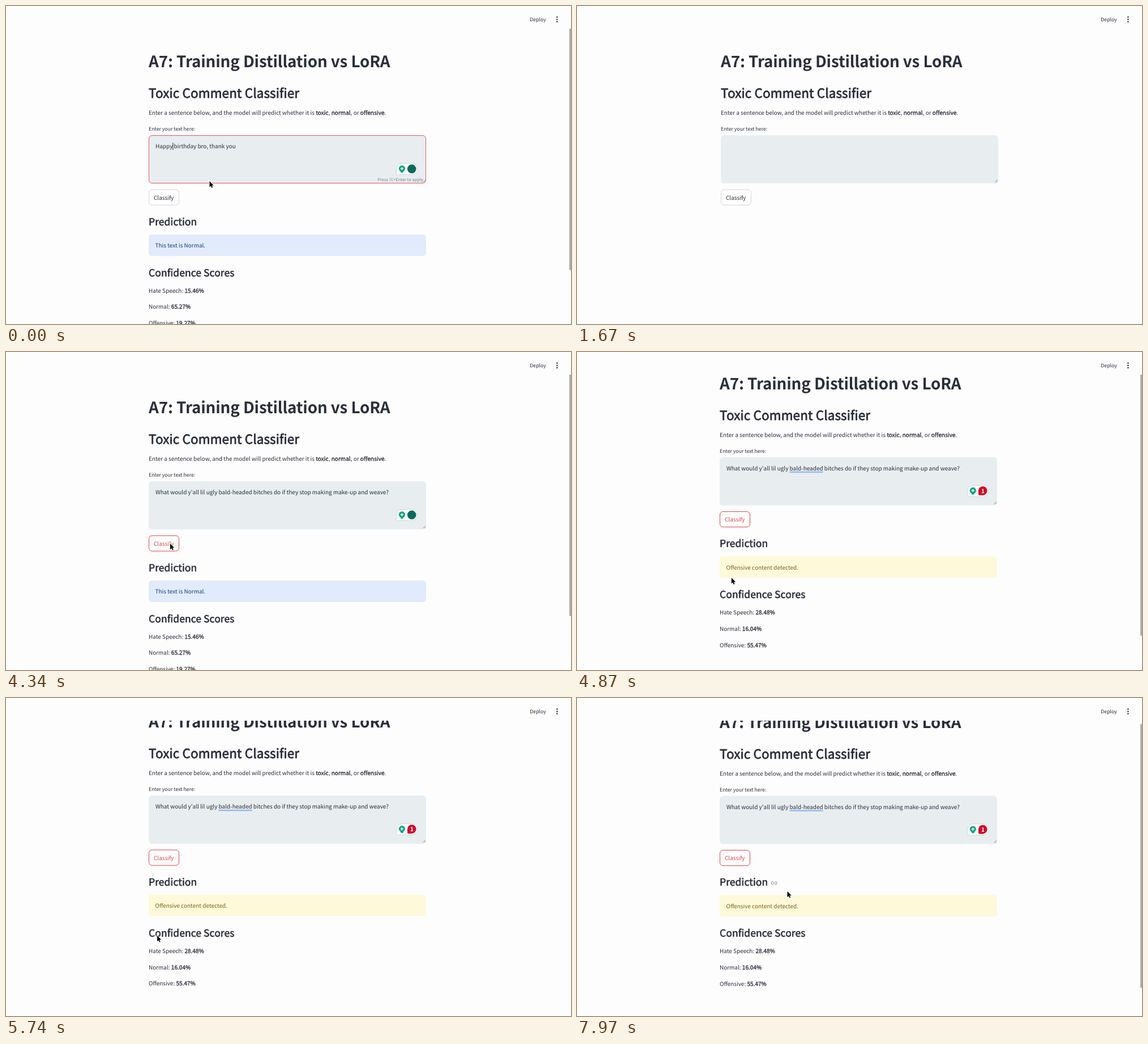
An HTML page with a canvas that plays this animation: 998x561 px, repeating every 8000 ms.

```html
<!DOCTYPE html>
<html lang="en">
<head>
<meta charset="utf-8">
<title>Toxic Comment Classifier</title>
<style>
  html, body { margin: 0; width: 100%; height: 100%; overflow: hidden; background: #fdfdfd; }
  canvas { display: block; width: 998px; height: 561px; }
</style>
</head>
<body>
<canvas id="stage"></canvas>
<script>
const W = 998, H = 561, LOOP = 8000;
const FAMILY = '"Noto Sans CJK JP", "Noto Sans CJK SC", "Noto Sans CJK", "Open Sans", sans-serif';
const PAPER = '#fdfdfd', INK = '#2b2d39', RED = '#d9484a', FIELD = '#e8edf0', GRAY = '#7f8088';
const LEFT = 252, WIDTH = 490, RADIUS = 5.5;
const BODY = 9.98, SMALL = 8.74, HINT = 7.48, H1 = 27.8, H2 = 22.44, H3 = 17.46;
const SCROLL_DEPTH = 56, SCROLL_EASE = 156, MOVE_TIME = 330;

const canvas = document.getElementById('stage');
const ctx = canvas.getContext('2d');
const dpr = window.devicePixelRatio || 1;
canvas.width = Math.round(W * dpr);
canvas.height = Math.round(H * dpr);

const GREETING = 'Happy birthday bro, thank you';
const QUESTION = "What would y'all lil ugly bald-headed bitches do if they stop making make-up and weave?";
const FLAGGED = 'bald-headed';

const RESULTS = {
  normal: {
    note: 'This text is Normal.', fill: '#e2ebfc', ink: '#103f75',
    scores: { 'Hate Speech': '15.46%', Normal: '65.27%', Offensive: '19.27%' }
  },
  offensive: {
    note: 'Offensive content detected.', fill: '#fdf9d9', ink: '#7d611c',
    scores: { 'Hate Speech': '28.48%', Normal: '16.04%', Offensive: '55.47%' }
  }
};

// Places the pointer moves between.
const AREA = { x: 359.5, y: 309 }, BUTTON = { x: 290, y: 338 };
const HEADING = { x: 267, y: 419 }, MARGIN = { x: 204, y: 400 }, NOTE = { x: 371.5, y: 341 };

const BLANK = {
  text: '', focus: false, hot: false, caret: false, result: null, bar: false,
  alert: false, link: null, path: null, scrollFrom: Infinity
};

// Each step changes part of the page state from its time on.
const STEPS = [
  [0, { ...BLANK, text: GREETING, focus: true, caret: true, result: 'normal', bar: true, path: [AREA, BUTTON] }],
  [450, { focus: false, hot: true, caret: false }],
  [850, { scrollFrom: 850, path: [BUTTON, HEADING] }],
  [1480, BLANK],
  [1980, { focus: true }],
  [2250, { text: GREETING, path: [AREA, BUTTON] }],
  [2740, { focus: false, hot: true }],
  [2830, { result: 'normal' }],
  [3000, { path: null }],
  [3640, { focus: true, hot: false }],
  [3900, { text: QUESTION, path: [AREA, BUTTON] }],
  [4270, { focus: false, hot: true, bar: true }],
  [4500, { result: 'offensive' }],
  [4650, { scrollFrom: 4650, path: [BUTTON, HEADING] }],
  [4800, { alert: true }],
  [5080, { link: 'scores' }],
  [5270, { link: null }],
  [5540, { bar: false }],
  [5800, BLANK],
  [6690, { focus: true }],
  [6990, { text: QUESTION }],
  [7190, { focus: false, hot: true }],
  [7640, { result: 'offensive', alert: true, bar: true, scrollFrom: 7250, path: [MARGIN, NOTE] }],
  [7870, { link: 'prediction' }]
];

function stateAt(t) {
  const state = {};
  for (const [start, change] of STEPS) {
    if (start > t) break;
    Object.assign(state, change);
    if (change.path) state.moveFrom = start;
  }
  const age = Math.max(0, t - state.scrollFrom);
  state.scroll = SCROLL_DEPTH * (1 - Math.exp(-age / SCROLL_EASE));
  return state;
}

// Draws text and returns where it ends; 'semi' thickens the regular weight.
function text(str, x, y, { size = BODY, color = INK, weight = 'regular' } = {}) {
  const semi = weight === 'semi';
  ctx.font = `${weight === 'bold' ? 700 : 400} ${size}px ${FAMILY}`;
  ctx.textRendering = 'geometricPrecision';
  ctx.letterSpacing = size * (semi ? 0.006 : weight === 'bold' ? -0.005 : 0) + 'px';
  ctx.fillStyle = color;
  ctx.fillText(str, x, y);
  if (semi) {
    ctx.lineWidth = size * 0.035;
    ctx.lineJoin = 'round';
    ctx.strokeStyle = color;
    ctx.strokeText(str, x, y);
  }
  return x + ctx.measureText(str).width;
}

// Sets a line in which **marked** parts are semibold.
function rich(str, x, y) {
  str.split('**').forEach((part, i) => {
    x = text(part, x, y, { weight: i % 2 ? 'semi' : 'regular' });
  });
}

function box(x, y, w, h, r, fill, stroke) {
  ctx.beginPath();
  ctx.roundRect(x, y, w, h, r);
  if (fill) { ctx.fillStyle = fill; ctx.fill(); }
  if (stroke) { ctx.strokeStyle = stroke; ctx.lineWidth = 1; ctx.stroke(); }
}

function disc(x, y, r, fill) {
  ctx.beginPath();
  ctx.arc(x, y, r, 0, Math.PI * 2);
  ctx.fillStyle = fill;
  ctx.fill();
}

function line(color, width, x1, y1, x2, y2) {
  ctx.beginPath();
  ctx.moveTo(x1, y1);
  ctx.lineTo(x2, y2);
  ctx.strokeStyle = color;
  ctx.lineWidth = width;
  ctx.stroke();
}

function linkIcon(x, y) {
  box(x - 5, y - 2.6, 10, 5.2, 2.6, null, GRAY);
  ctx.fillStyle = PAPER;
  ctx.fillRect(x - 1, y - 4, 2, 8);
  line(GRAY, 1, x - 2.2, y, x + 2.2, y);
}

function heading(str, y, linked) {
  const end = text(str, LEFT, y, { size: H3, weight: 'semi' });
  if (linked) linkIcon(end + 11, y - 4.8);
}

function badge(alert) {
  const green = '#13a383', x = 699.4, y = 286.8, r = 7.8;
  box(689.5, 277.5, 37, 20, [10, 10, 10, 2], PAPER, '#d3d6d9');
  disc(x, y, 5.6, green);
  box(x - 2.4, y + 4.2, 4.8, 3, 1, green);
  line('#fff', 1.5, x, y - 2.6, x, y + 2.6);
  line('#fff', 1.5, x - 2.6, y, x + 2.6, y);
  if (alert) {
    box(709, 279.5, 2 * r, 2 * r, [r, r, r, 2], '#c8102e');
    text('1', 714, 291, { color: '#fff', weight: 'bold' });
  } else {
    disc(716.7, 287.4, r, '#0b6b5d');
  }
}

function field(s) {
  const x = LEFT + 12, y = 251, right = LEFT + WIDTH - 1;
  const widthOf = str => ctx.measureText(str).width;
  text('Enter your text here:', LEFT, 220, { size: SMALL });
  box(LEFT + 0.5, 228.5, WIDTH - 1, 84, RADIUS, FIELD, s.focus ? '#df5a60' : FIELD);
  for (const d of [4.5, 1.8]) line('#777', 0.8, right - d, 311, right, 311 - d);
  if (!s.text) return;

  text(s.text, x, y);
  if (s.alert) {
    const from = x + widthOf(s.text.split(FLAGGED)[0]);
    line('#82b1ee', 2, from, y + 3.2, from + widthOf(FLAGGED), y + 3.2);
  }
  if (s.caret) {
    const at = x + widthOf('Happy') + 0.5;
    line(INK, 1, at, y - 10, at, y + 3);
  }
  badge(s.alert);
  if (s.focus) {
    ctx.textAlign = 'right';
    text('Press \u2318+Enter to apply', right - 4, 309, { size: HINT, color: GRAY });
    ctx.textAlign = 'left';
  }
}

function results(s) {
  const r = RESULTS[s.result];
  heading('Prediction', 386.8, s.link === 'prediction');
  box(LEFT, 403, WIDTH, 38, RADIUS, r.fill);
  text(r.note, LEFT + 11.5, 426, { color: r.ink });
  heading('Confidence Scores', 476.6, s.link === 'scores');
  Object.entries(r.scores).forEach(([name, score], i) => {
    rich(`${name}: **${score}**`, LEFT, 505.6 + i * 28.85);
  });
}

function page(s) {
  text('A7: Training Distillation vs LoRA', LEFT, 108.4, { size: H1, weight: 'bold' });
  text('Toxic Comment Classifier', LEFT, 162, { size: H2, weight: 'semi' });
  rich('Enter a sentence below, and the model will predict whether it is ' +
    '**toxic**, **normal**, or **offensive**.', LEFT, 192);
  field(s);
  box(LEFT + 0.5, 324, 53, 27.2, RADIUS, PAPER, s.hot ? RED : '#d5d6da');
  text('Classify', LEFT + 9, 341.6, { color: s.hot ? RED : INK });
  if (s.result) results(s);
}

function header() {
  ctx.fillStyle = PAPER;
  ctx.fillRect(0, 0, W, 40);
  text('Deploy', 925.3, 27.2, { size: SMALL });
  for (const d of [-1, 0, 1]) disc(973.4, 23.7 + d * 4.1, 1.25, INK);
}

const ARROW = new Path2D('M0 0V10.4L2.4 8.2L4 11.8L5.7 11L4.1 7.5L7.3 7.4Z');
const BEAM = new Path2D('M-2.5 -6L0 -5L2.5 -6M0 -5V5M-2.5 6L0 5L2.5 6');

function pointer(s, t) {
  if (!s.path) return;
  const [a, b] = s.path;
  const k = Math.min(1, (t - s.moveFrom) / MOVE_TIME);
  const ease = k * k * (3 - 2 * k);
  ctx.save();
  ctx.translate(a.x + (b.x - a.x) * ease, a.y + (b.y - a.y) * ease);
  if (s.link === 'scores') {
    ctx.lineWidth = 1;
    ctx.strokeStyle = '#222';
    ctx.stroke(BEAM);
  } else {
    ctx.lineWidth = 1.6;
    ctx.strokeStyle = '#fff';
    ctx.stroke(ARROW);
    ctx.fillStyle = '#000';
    ctx.fill(ARROW);
  }
  ctx.restore();
}

function render(t) {
  const s = stateAt(t);
  ctx.setTransform(dpr, 0, 0, dpr, 0, 0);
  ctx.fillStyle = PAPER;
  ctx.fillRect(0, 0, W, H);

  // Without results the page has no scroll gutter and sits 2px to the right.
  ctx.save();
  ctx.translate(s.result ? 0 : 2, s.result ? -s.scroll : 0);
  page(s);
  ctx.restore();

  if (s.bar) box(995, s.scroll * 0.82, 4, 466, 2, '#aeaeb0');
  header();
  pointer(s, t);
}

const start = performance.now();
function tick() {
  render((performance.now() - start) % LOOP);
  requestAnimationFrame(tick);
}
tick();
</script>
</body>
</html>
```
